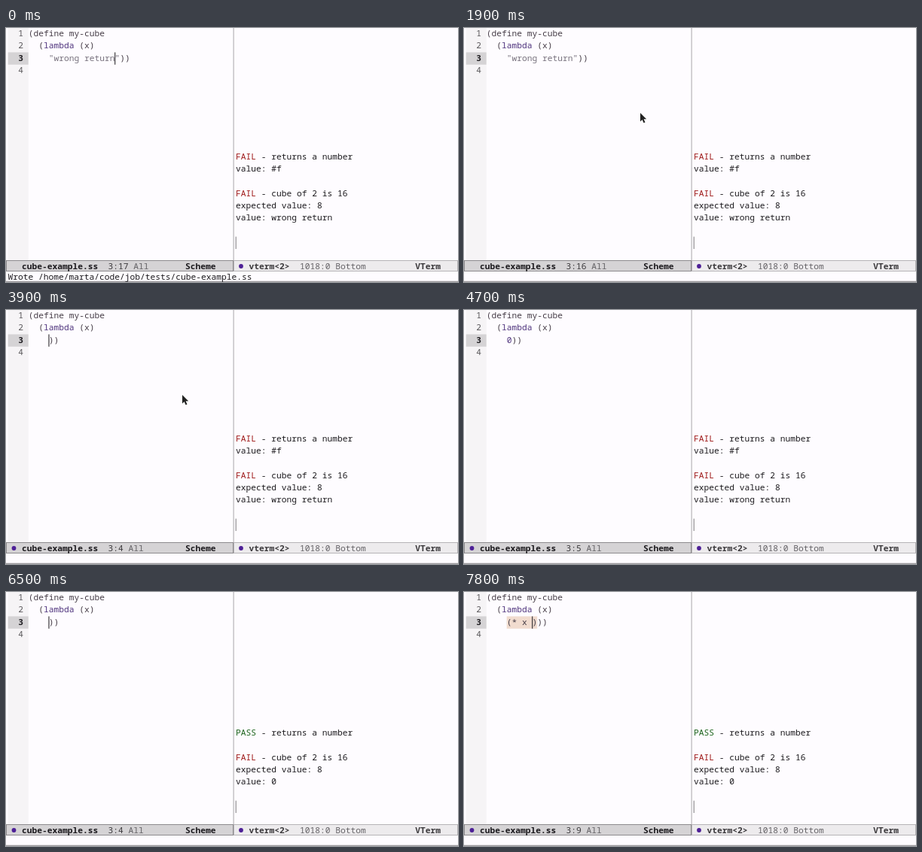
An HTML page that plays this animation: 600x338 px, repeating every 8 s.

```html
<!DOCTYPE html>
<html lang="en">
<head>
<meta charset="utf-8">
<title>Editor and test runner</title>
<style>
  html, body { margin: 0; width: 100%; height: 100%; overflow: hidden; background: #fefcff; }
  svg { display: block; width: 600px; height: 338px; }
  text { font: 11.25px "Noto Sans Mono", "DejaVu Sans Mono", monospace; white-space: pre; }
  .bold { font-weight: 700; }
</style>
</head>
<body>
<svg id="stage" viewBox="0 0 600 338"></svg>
<script>
(() => {
const LOOP = 8000, CW = 6.75, ROW = 16.35, CODE_X = 29.7, TERM_X = 305;
const INK = '#1c1a1e', CODE = '#463d47', DIM = '#646266', STRING = '#77717d',
      PURPLE = '#50357e', DOT = '#4d1f96', RED = '#a01c1c', GREEN = '#1d641d';
const stage = document.getElementById('stage');

// Each event overrides part of the editor state from its time on.
const events = [
  [0, { body: '"wrong return"', col: 17, cursor: true, dirty: false, wrote: true, pass: false }],
  [1400, { col: 16, wrote: false }],
  [1900, { cursor: false }],
  [2100, { col: 17, cursor: true }],
  [2300, { col: 18 }],
  [2700, { body: '"wrong return', col: 17, dirty: true }],
  [3200, { body: '"wrong ret', col: 14 }],
  [3300, { body: '"wrong ', col: 11 }],
  [3400, { body: '"wro', col: 8 }],
  [3500, { body: '"', col: 5 }],
  [3900, { body: '', col: 4 }],
  [4200, { body: '0', col: 5 }],
  [4700, { cursor: false }],
  [4900, { cursor: true, dirty: false, wrote: true }],
  [5100, { pass: true }],
  [5400, { cursor: false }],
  [6000, { cursor: true }],
  [6500, { body: '', col: 4, dirty: true, wrote: false }],
  [6900, { body: '()', col: 5 }],
  [7100, { body: '(*)', col: 6 }],
  [7400, { body: '(* )', col: 7 }],
  [7600, { body: '(* x)', col: 8 }],
  [7800, { body: '(* x )', col: 9 }],
];

// Pointer path: time, x, y. Hidden before the first and after the last point.
const path = [
  [100, 240, 130], [500, 198, 92], [900, 146, 43], [1200, 144, 42],
  [1320, 141, 42], [1600, 234, 113], [4200, 234, 113],
];

const esc = s => s.replace(/&/g, '&amp;').replace(/</g, '&lt;');
const rect = (x, y, w, h, fill) =>
  `<rect x="${x}" y="${y}" width="${w}" height="${h}" fill="${fill}"/>`;
const text = (x, y, s, fill = INK, bold = false) =>
  `<text x="${x}" y="${y}" fill="${fill}"${bold ? ' class="bold"' : ''}>${esc(s)}</text>`;
const dot = x => `<circle cx="${x}" cy="317" r="2.9" fill="${DOT}"/>`;
const rowTop = row => row * ROW - 0.3;
const baseline = row => row * ROW + 11;
const code = (row, col, s, fill = CODE) => text(CODE_X + col * CW, baseline(row), s, fill);
const term = (row, s, col = 0, fill = INK) => text(TERM_X + col * CW, baseline(row), s, fill);
const result = (row, ok, s) =>
  term(row, ok ? 'PASS' : 'FAIL', 0, ok ? GREEN : RED) + term(row, '- ' + s, 5);

function stateAt(t) {
  const s = {};
  for (const [at, patch] of events) if (at <= t) Object.assign(s, patch);
  return s;
}

function editor({ body, col, cursor }) {
  const open = /^"[^"]*$/.test(body);
  const fill = body[0] === '"' ? STRING : body === '0' ? PURPLE : CODE;
  let out = rect(2.7, 0, 27, 309, '#f6f4f6') + rect(2.7, rowTop(2), 27, ROW, '#d5d3d5');
  for (let i = 0; i < 4; i++)
    out += text(16.2, baseline(i), String(i + 1), i === 2 ? INK : '#59575a', i === 2);
  if (body[0] === '(')
    out += rect(CODE_X + 4 * CW, rowTop(2), body.length * CW, ROW, '#f1dccf');
  out += code(0, 0, '(define my-cube') + code(1, 2, '(') + code(1, 3, 'lambda', PURPLE)
    + code(1, 10, '(x)') + code(2, 4, body, fill)
    + code(2, 4 + body.length, '))', open ? STRING : CODE);
  if (cursor) out += rect(CODE_X + col * CW - 0.3, rowTop(2), 1.1, ROW, '#2c292e');
  return out;
}

function terminal({ pass }) {
  return (pass
    ? result(11, true, 'returns a number')
    : result(10, false, 'returns a number') + term(11, 'value: #f'))
    + result(13, false, 'cube of 2 is 16') + term(14, 'expected value: 8')
    + term(15, 'value: ' + (pass ? '0' : 'wrong return'))
    + rect(TERM_X - 0.3, rowTop(17), 1, ROW, '#7c7a7d');
}

function bars({ col, dirty, wrote }) {
  const pos = '3:' + col, y = 320.6;
  const bar = (x, w, fill, line) =>
    `<rect x="${x + 0.5}" y="309.5" width="${w - 1}" height="14" fill="${fill}" stroke="${line}"/>`;
  return rect(301.6, 0, 1, 309, '#a9a7aa')
    + bar(0, 302, '#d5d3d5', '#8d8b8e') + bar(302, 298, '#edebed', '#b5b3b6')
    + (dirty ? dot(10.5) : '')
    + text(21, y, 'cube-example.ss', INK, true) + text(135.4, y, pos, '#3a383b')
    + text(135.4 + (pos.length + 1) * CW, y, 'All', DIM)
    + text(238, y, 'Scheme', INK, true)
    + dot(312) + text(322.5, y, 'vterm<2>', '#3a383b', true)
    + text(390, y, '1018:0 Bottom', DIM) + text(543.3, y, 'VTerm', '#3a383b', true)
    + rect(0, 336.8, 600, 1, '#858386')
    + (wrote ? text(2.4, 335, 'Wrote /home/marta/code/job/tests/cube-example.ss') : '');
}

function pointer(t) {
  const i = path.findIndex(p => p[0] > t);
  if (i < 1) return '';
  const [t0, x0, y0] = path[i - 1], [t1, x1, y1] = path[i];
  const k = (t - t0) / (t1 - t0), x = x0 + (x1 - x0) * k, y = y0 + (y1 - y0) * k;
  const overText = x < 164 && y > 32 && y < 50;
  const at = `transform="translate(${x.toFixed(2)} ${y.toFixed(2)})"`;
  const beam = 'M-2.2-5.2Q0-5.2 0-3.8Q0-5.2 2.2-5.2M0-4V4.2M-2.2 5.4Q0 5.4 0 4Q0 5.4 2.2 5.4';
  return overText
    ? `<g ${at} fill="none"><path d="${beam}" stroke="#fff" stroke-width="2.6"/>` +
      `<path d="${beam}" stroke="#222" stroke-width="1.2"/></g>`
    : `<path ${at} d="M0 0V11.4L2.6 9 4.5 13.3 6.5 12.4 4.6 8.2H8.2Z"
        fill="#222" stroke="#fff" stroke-width="1.1" paint-order="stroke"/>`;
}

let shown = '';
function draw(now) {
  const t = now % LOOP, s = stateAt(t);
  const next = editor(s) + terminal(s) + bars(s) + pointer(t);
  if (next !== shown) stage.innerHTML = shown = next;
}

const start = performance.now();
function tick() {
  draw(performance.now() - start);
  requestAnimationFrame(tick);
}
tick();
})();
</script>
</body>
</html>
```
